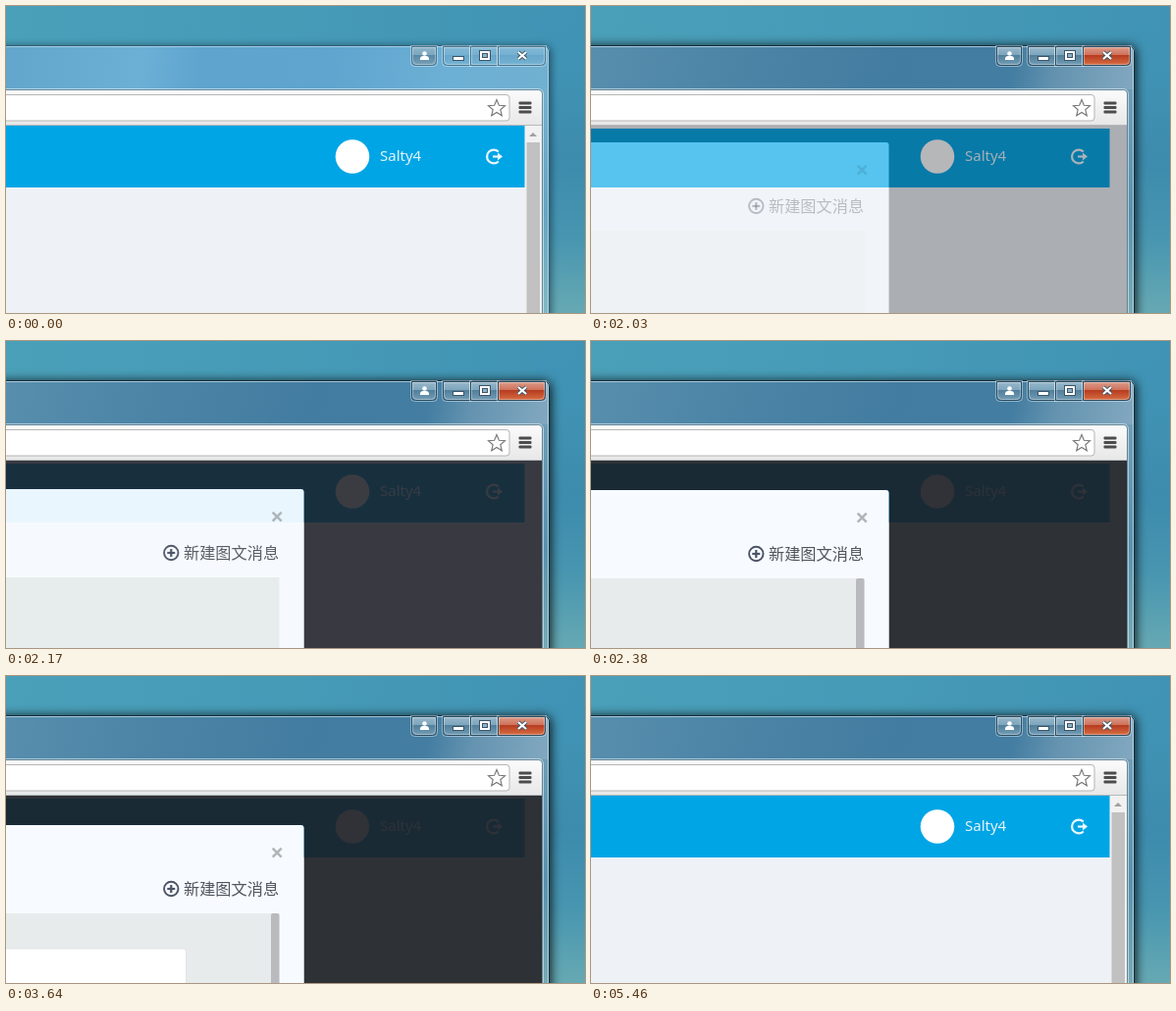
These frames come from a looping animation (590 by 313 pixels, 6930 ms). An HTML page with a canvas:

```html
<!DOCTYPE html>
<html lang="zh">
<head>
<meta charset="utf-8">
<title>Dialog demo</title>
<style>
html, body { margin: 0; width: 100%; height: 100%; overflow: hidden; }
canvas { display: block; width: 590px; height: 313px; }
</style>
</head>
<body>
<canvas id="stage" width="590" height="313"></canvas>
<script>
const ctx = document.getElementById('stage').getContext('2d');
const W = 590, H = 313, LOOP = 6930;
const ACTIVE = 1890, OPEN = 2030, STEP = 70, SCROLLBAR = 2380, CARD = 2520, CLOSE = 5460;
const FADE = [0.35, 0.7, 0.95, 1];
const PAGE = '#eef1f6', HEADER = '#00a5e5', RISE = 20;

function fill(color, x, y, w, h) {
  ctx.fillStyle = color;
  ctx.fillRect(x, y, w, h);
}

function gradient(x0, y0, x1, y1, ...stops) {
  const g = ctx.createLinearGradient(x0, y0, x1, y1);
  stops.forEach(([at, color]) => g.addColorStop(at, color));
  return g;
}

function box(x, y, w, h, r, color, edge, width = 1) {
  ctx.beginPath();
  ctx.roundRect(x, y, w, h, r);
  if (color) {
    ctx.fillStyle = color;
    ctx.fill();
  }
  if (edge) {
    ctx.strokeStyle = edge;
    ctx.lineWidth = width;
    ctx.stroke();
  }
}

function line(color, width, ...points) {
  ctx.strokeStyle = color;
  ctx.lineWidth = width;
  ctx.beginPath();
  points.forEach(([x, y]) => ctx.lineTo(x, y));
  ctx.stroke();
}

function shape(color, ...points) {
  ctx.fillStyle = color;
  ctx.beginPath();
  points.forEach(([x, y]) => ctx.lineTo(x, y));
  ctx.fill();
}

function disc(color, x, y, r) {
  ctx.fillStyle = color;
  ctx.beginPath();
  ctx.arc(x, y, r, 0, Math.PI * 2);
  ctx.fill();
}

function text(str, x, y, font, color) {
  ctx.font = font;
  ctx.fillStyle = color;
  ctx.fillText(str, x, y);
}

function drawDesktop() {
  fill(gradient(0, 0, W, 0, [0, '#4aa0b9'], [0.5, '#469bb7'], [1, '#4093b4']), 0, 0, W, H);
  fill(gradient(0, 0, 0, H, [0, 'rgba(62,146,180,0)'], [0.2, '#4093b4'],
    [0.5, '#3d8bad'], [0.75, '#4795b0'], [1, '#66a9b3']), 540, 0, 50, H);
}

function drawFrame(active) {
  ctx.save();
  ctx.shadowColor = active ? 'rgba(0,0,0,.9)' : 'rgba(0,20,35,.6)';
  ctx.shadowBlur = active ? 11 : 8;
  ctx.shadowOffsetX = ctx.shadowOffsetY = 1;
  box(-20, 40, 574, 320, 6, '#5d9bbd');
  ctx.restore();

  ctx.save();
  box(-20, 40, 574, 320, 6);
  ctx.clip();
  fill(active
    ? gradient(0, 40, 550, 150, [0, '#588ead'], [0.3, '#4a83a5'], [0.55, '#427ca0'],
        [0.76, '#437da1'], [0.84, '#6493b0'], [1, '#86abc2'])
    : gradient(0, 40, 550, 110, [0, '#63a6cb'], [0.25, '#6cb0d5'], [0.36, '#5ea4cf'],
        [0.6, '#5fa5cf'], [0.82, '#6db0d5'], [1, '#70b0d0']), 0, 40, 554, 273);
  fill(gradient(0, 85, 0, H, [0, active ? '#6f9db8' : '#75b1cd'],
    [0.55, active ? '#5992ad' : '#66a5c2'], [1, active ? '#78aab5' : '#83b9c3']), 546, 85, 8, 228);
  ctx.restore();

  box(-20, 40.5, 573.5, 320, 6, null, active ? '#17313f' : '#365f78');
  box(-20, 41.5, 572.5, 320, 5, null, active ? 'rgba(215,240,250,.65)' : 'rgba(205,235,250,.6)');
}

function drawButton(x, w, radii, colors, edge) {
  const [a, b, c, d] = colors;
  const h = 19;
  box(x - 0.5, 40.5, w + 2, h + 2, radii, null, 'rgba(225,240,248,.45)');
  box(x + 0.5, 41.5, w, h, radii,
    gradient(0, 41, 0, 60, [0, a], [0.45, b], [0.5, c], [1, d]), edge);
  box(x + 1.5, 42.5, w - 2, h - 2, radii, null, 'rgba(255,255,255,.35)');
}

function drawButtons(active) {
  const edge = active ? '#294b60' : '#47768f';
  const blue = active
    ? ['#9bbacc', '#7ea6bd', '#527f9b', '#729cb5']
    : ['#84bad7', '#76b1d2', '#68a7cb', '#75b2d2'];
  const red = ['#dda08f', '#cf735c', '#b63d21', '#d66c42'];
  const user = active ? blue : ['#92b7ca', '#7ba7bf', '#5889a6', '#789fb5'];
  drawButton(413, 25, [0, 0, 4, 4], user, edge);
  drawButton(445, 28, [0, 0, 0, 4], blue, edge);
  drawButton(473, 28, 0, blue, edge);
  drawButton(501, 48, [0, 0, 4, 0], active ? red : blue, edge);

  const dark = '#3c5668';
  disc('#fff', 426.5, 48.5, 2.3);
  box(422, 51, 9, 4, [3, 3, 0, 0], '#fff');
  fill(dark, 455, 51, 12, 5);
  fill('#fff', 456, 52, 10, 3);
  fill(dark, 482, 45, 12, 11);
  fill('#fff', 483, 46, 10, 9);
  fill(dark, 485, 48, 6, 5);
  fill('#8fb2c6', 486, 49, 4, 3);
  for (const [color, width] of [[dark, 4], ['#fff', 2.2]]) {
    line(color, width, [522, 47], [530, 54]);
    line(color, width, [530, 47], [522, 54]);
  }
}

function drawToolbar() {
  box(-10, 84.5, 557.5, 300, [0, 5, 0, 0], null, 'rgba(225,242,250,.6)');
  box(-10, 85.5, 556.5, 300, [0, 4, 0, 0],
    gradient(0, 86, 0, 122, [0, '#fbfbfb'], [1, '#e7e7e7']), 'rgba(45,85,105,.6)');
  box(-10, 90.5, 523, 26.5, 3, '#fff', '#b5b5b5');

  ctx.beginPath();
  for (let i = 0; i < 10; i++) {
    const a = -Math.PI / 2 + i * Math.PI / 5, r = i % 2 ? 4 : 9;
    ctx.lineTo(500 + r * Math.cos(a), 104.5 + r * Math.sin(a));
  }
  ctx.closePath();
  ctx.strokeStyle = '#777';
  ctx.lineWidth = 1.1;
  ctx.stroke();
  for (let i = 0; i < 3; i++) box(522.5, 97.5 + i * 4.5, 13, 3, 1, '#4c4c4c');
  fill('#b5b9bc', 0, 121, 546, 1);
}

function drawPage(locked) {
  fill(PAGE, 0, 122, 546, 191);
  const top = locked ? 125 : 122;
  fill(HEADER, 0, top, 528.5, 185 - top);
  disc('#fff', 353, 153.5, 17.3);
  text('Salty4', 381, 157.5, '500 15px "Noto Sans", "Open Sans", sans-serif', '#e2f4fc');

  const icon = '#eaf7fd';
  ctx.strokeStyle = icon;
  ctx.lineWidth = 2.2;
  ctx.beginPath();
  ctx.arc(497, 153.5, 6.9, 0.8, Math.PI * 2 - 0.8);
  ctx.stroke();
  line(icon, 2.2, [496, 153.5], [503, 153.5]);
  shape(icon, [501, 149.5], [506, 153.5], [501, 157.5]);

  if (locked) return;
  fill('#f1f1f1', 529, 122, 17, 191);
  fill('#c1c1c1', 530.5, 139, 13.5, 174);
  shape('#a0a0a0', [533, 133], [537, 129], [541, 133]);
}

function drawDialog(t) {
  const fade = FADE[Math.min(3, Math.floor((t - OPEN) / STEP))];
  const dy = -RISE * (1 - fade);
  const panel = [-10, 152 + dy, 313.5, 220, [0, 3, 0, 0]];

  // The shade surrounds the dialog but does not lie behind it.
  ctx.save();
  ctx.beginPath();
  ctx.rect(0, 122, 546, 191);
  ctx.clip();
  ctx.globalAlpha = fade;
  ctx.beginPath();
  ctx.rect(-20, 100, 600, 300);
  ctx.roundRect(...panel);
  ctx.fillStyle = 'rgba(28,30,36,.91)';
  ctx.fill('evenodd');
  box(...panel, '#f7fbff');

  ctx.translate(0, dy);
  ctx.beginPath();
  for (const side of [-1, 1]) {
    ctx.moveTo(276.2 - 4.5 * side, 175.7);
    ctx.lineTo(276.2 + 4.5 * side, 184.7);
  }
  ctx.strokeStyle = 'rgba(0,0,0,.28)';
  ctx.lineWidth = 2.6;
  ctx.stroke();

  const ink = '#4b5364';
  ctx.strokeStyle = ink;
  ctx.lineWidth = 1.9;
  ctx.beginPath();
  ctx.arc(168.3, 217, 7.2, 0, Math.PI * 2);
  ctx.stroke();
  line(ink, 2.2, [164.3, 217], [172.3, 217]);
  line(ink, 2.2, [168.3, 213], [168.3, 221]);
  text('新建图文消息', 181, 222.5, '16.2px "Noto Sans CJK SC", "Noto Sans CJK", sans-serif', '#50555e');

  fill('#e7ebeb', 0, 242, 278.5, 100);
  if (t >= SCROLLBAR) box(270, 242, 8.5, 90, 2, '#b8babd');
  if (t >= CARD) box(-10, 278, 193.5, 60, 3, '#fff', '#dfe3e4', 0.8);
  ctx.restore();
}

function draw(t) {
  const active = t >= ACTIVE;
  const open = t >= OPEN && t < CLOSE;
  drawDesktop();
  drawFrame(active);
  drawButtons(active);
  drawToolbar();
  drawPage(open);
  if (open) drawDialog(t);
}

const start = performance.now();
function tick() {
  draw((performance.now() - start) % LOOP);
  requestAnimationFrame(tick);
}
tick();
</script>
</body>
</html>
```
